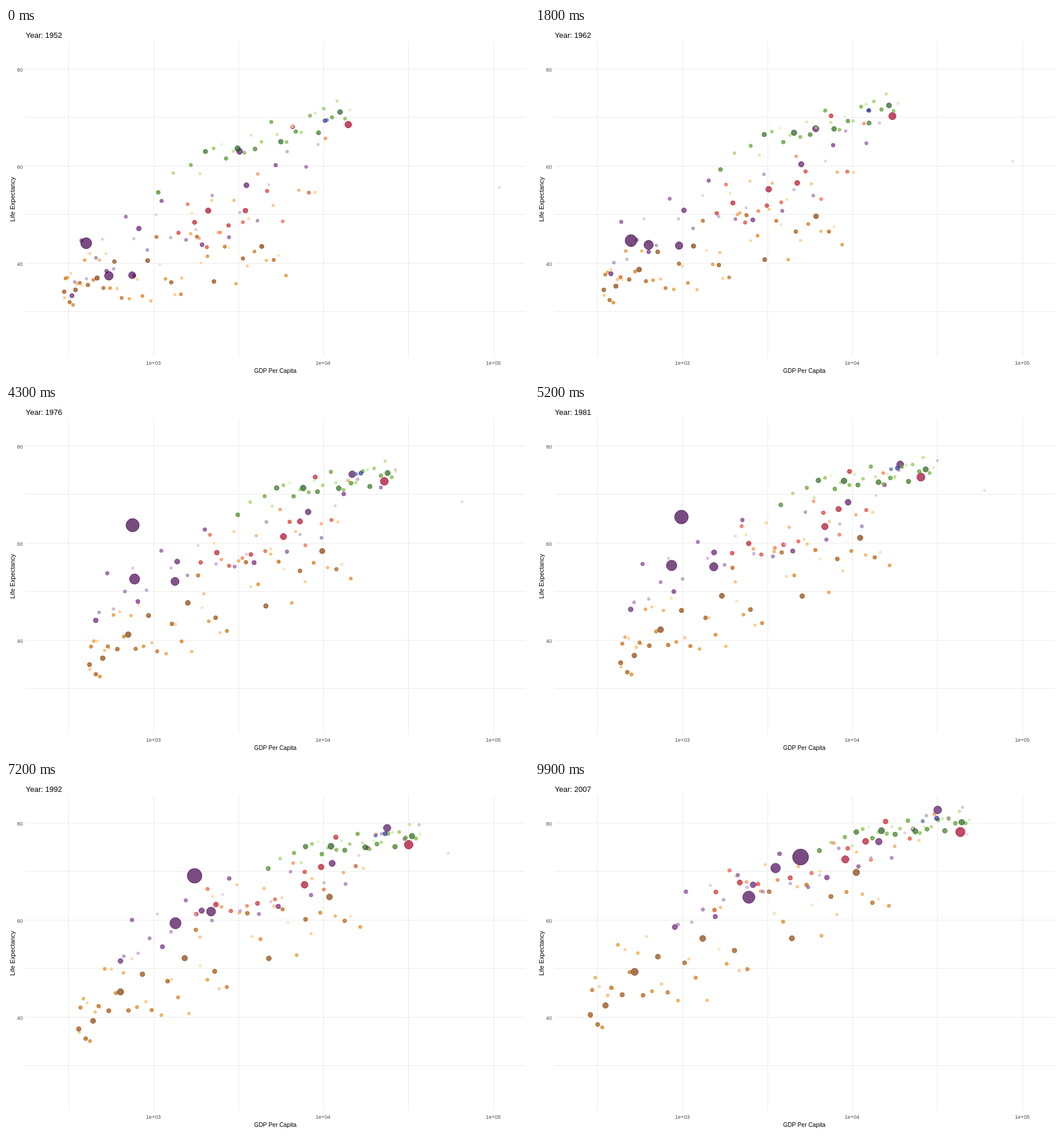
Write an HTML page that moves like this. It is 900 px wide and 600 px high and loops after 10 s.

```html
<!DOCTYPE html>
<html lang="en">
<head>
<meta charset="utf-8">
<title>Life expectancy and GDP</title>
<style>
  html, body { margin: 0; width: 100%; height: 100%; overflow: hidden; background: #fff; }
  svg { display: block; width: 900px; height: 600px; }
  text { font-family: "Liberation Sans", Arial, sans-serif; }
  #grid { fill: #ebebeb; shape-rendering: crispEdges; }
  #ticks { font-size: 9px; fill: #4d4d4d; }
  circle { fill-opacity: .7; stroke-opacity: .7; stroke-width: 1; }
</style>
</head>
<body>
<svg viewBox="0 0 900 600">
  <g id="grid"></g>
  <g id="dots"></g>
  <g id="ticks"></g>
  <text id="year" x="34" y="17" font-size="13">Year: 1952</text>
  <text x="463.5" y="593" font-size="10.2" text-anchor="middle">GDP Per Capita</text>
  <text transform="translate(15 294.5) rotate(-90)" font-size="10.9" text-anchor="middle">Life Expectancy</text>
</svg>
<script>
const LOOP = 10000, STEP = 100, LAST = LOOP / STEP - 1;

// Each family scatters around a line whose two ends move.
// Paths are points evenly spaced in time; leads are paths of single dots by rank.
const families = [
  {
    size: 52, ramp: ['#7f3b08', '#b35806', '#e08214', '#fdb863', '#fee0b6'],
    left: [[100, 430], [150, 410], [95, 350]],
    right: [[490, 380], [620, 230], [620, 165]],
    skew: 1.6, spread: [70, 95], bulge: 0.6, decay: 4, growth: 3
  },
  {
    size: 25, ramp: ['#a50026', '#d73027', '#f46d43', '#fdae61', '#fee090'],
    left: [[296, 370], [340, 265], [310, 190]],
    right: [[565, 200], [610, 130], [710, 60]],
    skew: 1.2, spread: [90, 38], bulge: 2.5, decay: 2, growth: 0.7,
    leads: {
      0: [[589, 166], [732, 86]],
      1: [[348, 314], [497, 213], [534, 133]],
      2: [[412, 314], [520, 183], [569, 102]]
    }
  },
  {
    size: 33, ramp: ['#40004b', '#762a83', '#9970ab', '#c2a5cf', '#e7d4e8'],
    left: [[113, 400], [160, 310], [240, 215]],
    right: [[545, 270], [700, 150], [745, 80]],
    skew: 1.4, spread: [105, 65], bulge: 6.2, decay: 2.6, growth: 0.6,
    leads: {
      0: [[138, 370], [168, 365], [205, 212], [280, 181], [350, 150], [457, 129]],
      1: [[177, 426], [228, 280], [368, 198]],
      2: [[217, 425], [302, 285], [414, 148]],
      3: [[402, 212], [625, 105], [693, 48]],
      32: [[849, 274], [775, 150], [744, 90]]
    }
  },
  {
    size: 30, ramp: ['#1f5a1c', '#4d9221', '#7fbc41', '#b8e186', '#e6f5d0'],
    left: [[250, 265], [410, 160], [480, 108]],
    right: [[595, 140], [685, 110], [750, 65]],
    skew: 0.7, spread: [34, 20], bulge: 1.4, decay: 4, growth: 0.1
  },
  {
    size: 2, ramp: ['#313695', '#6fa3cf'],
    left: [[547, 160], [703, 60]],
    right: [[553, 158], [664, 68]],
    skew: 1, spread: [0, 0], bulge: 0, decay: 1, growth: 0
  }
];

const byId = id => document.getElementById(id);
const lerp = (a, b, t) => a + (b - a) * t;

function add(parent, tag, attrs, text = '') {
  const el = document.createElementNS('http://www.w3.org/2000/svg', tag);
  for (const key in attrs) el.setAttribute(key, attrs[key]);
  el.textContent = text;
  return byId(parent).appendChild(el);
}

let seed = 1952;
function random() {
  seed = (seed * 16807) % 2147483647;
  return seed / 2147483647;
}

// Value at t (0 to 1) on evenly spaced points of any dimension.
function along(points, t) {
  const at = t * (points.length - 1);
  const i = Math.min(Math.floor(at), points.length - 2);
  return points[i].map((v, k) => lerp(v, points[i + 1][k], at - i));
}

const rgb = hex => [1, 3, 5].map(i => parseInt(hex.slice(i, i + 2), 16));
const shade = (ramp, p) => `rgb(${along(ramp.map(rgb), p).map(Math.round)})`;

// A place in the scatter that drifts a little over the loop.
function crowdPlace({ left, right, skew, spread }, rank) {
  const share = ((rank * 0.618034 + 0.3) % 1) ** skew;
  const off = random() + random() - 1;
  const drift = 0.4 * (random() - 0.5);
  return t => {
    const [x0, y0] = along(left, t);
    const [x1, y1] = along(right, t);
    return [lerp(x0, x1, share), lerp(y0, y1, share) + lerp(...spread, t) * (off + drift * t)];
  };
}

const dots = [];
for (const family of families) {
  const { size, ramp, leads = {}, bulge, decay, growth } = family;
  for (let rank = size - 1; rank >= 0; rank--) {
    const p = rank / size;
    const color = shade(ramp, p);
    const extra = bulge * Math.exp(-rank / decay);
    dots.push({
      el: add('dots', 'circle', { fill: color, stroke: color }),
      place: leads[rank] ? t => along(leads[rank], t) : crowdPlace(family, rank),
      radius: t => 2 + 1.3 * (1 - p) * (1 + 0.4 * t) + extra * (1 + growth * t)
    });
  }
}

for (let i = 0; i < 6; i++) {
  const x = Math.floor(107.9 + 146.25 * i);
  const y = Math.floor(70.4 + 83.4 * i);
  add('grid', 'rect', { x, y: 23, width: 1, height: 542 });
  add('grid', 'rect', { x: 34, y, width: 860, height: 1 });
  if (i % 2) add('ticks', 'text', { x: x - 0.5, y: 579, 'text-anchor': 'middle' }, `1e+0${(i + 5) / 2}`);
  else if (i < 5) add('ticks', 'text', { x: 29, y: y + 4.5, 'text-anchor': 'end' }, 80 - 10 * i);
}

function draw(now) {
  const t = Math.floor((now % LOOP) / STEP) / LAST;
  byId('year').textContent = `Year: ${Math.round(1952 + 55 * t)}`;
  for (const { el, place, radius } of dots) {
    const [x, y] = place(t);
    el.setAttribute('cx', x);
    el.setAttribute('cy', y);
    el.setAttribute('r', radius(t));
  }
}

const start = performance.now();
function tick() {
  draw(performance.now() - start);
  requestAnimationFrame(tick);
}
draw(0);
requestAnimationFrame(tick);
</script>
</body>
</html>
```
